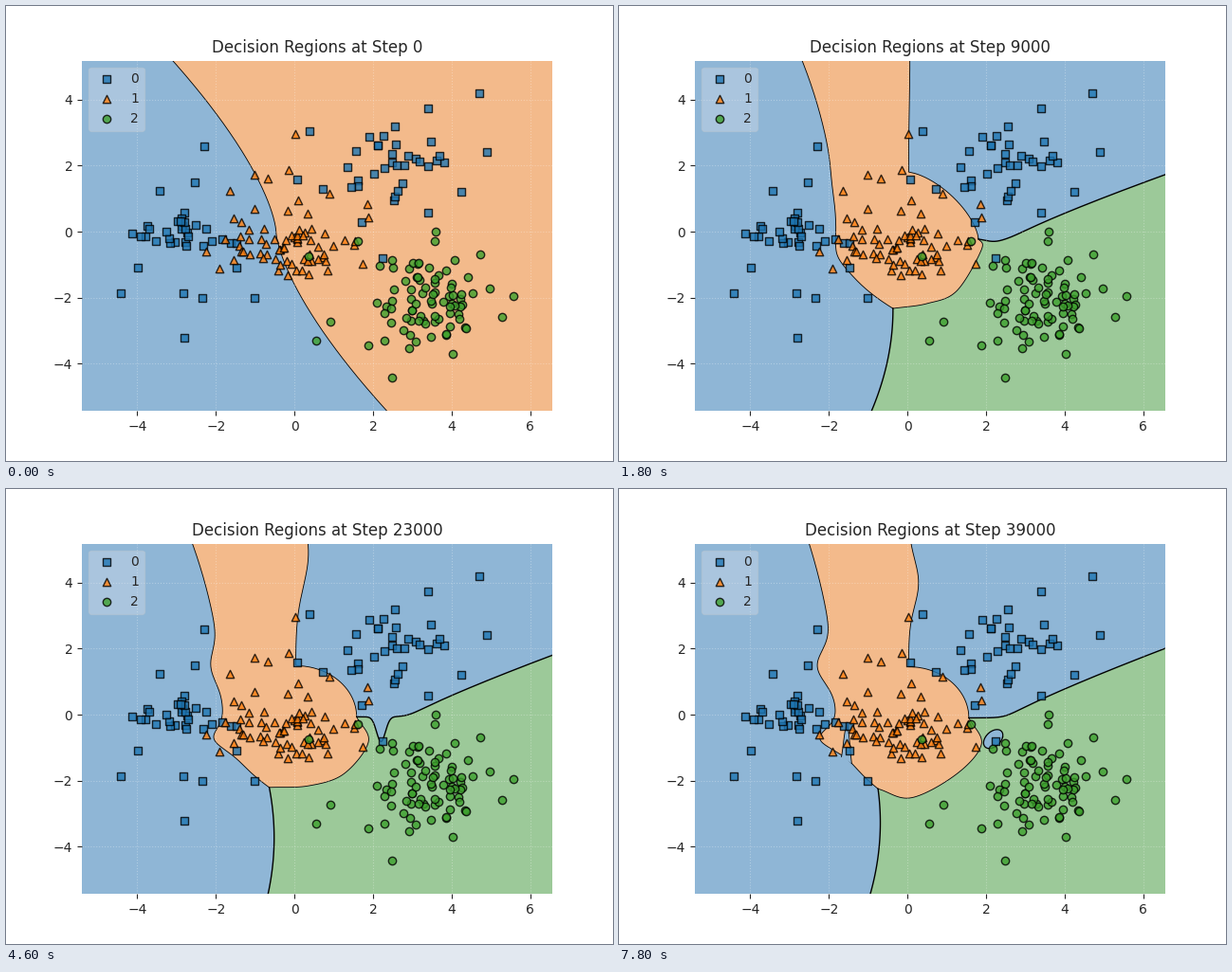
Animation, 640 px wide and 480 px high, one loop 8000 ms. Source, as a matplotlib script:

```python
import numpy as np
import matplotlib.pyplot as plt
from matplotlib.animation import FuncAnimation
from matplotlib.colors import to_rgb

INK, FACE = "#262626", "#eaeaf2"
BLUE, ORANGE, GREEN = "#1f77b4", "#ff7f0e", "#3ca02c"
FRAMES = 40
RIGHT = 6.56      # right end of the x axis
SPLIT = 28        # frame at which the notch becomes an island

plt.rcParams.update({"font.family": "DejaVu Sans", "text.color": INK,
                     "xtick.color": INK, "ytick.color": INK})
rng = np.random.default_rng(7)


def tint(color):
    return 0.45 * np.array(to_rgb(color)) + 0.55 * np.array(to_rgb(FACE))


def bump(v, center, width):
    return np.exp(-((v - center) / width) ** 2)


def at(i, *values):
    """Value at frame i from five stages of the training."""
    return np.interp(i, (1, 9, 16, 25, 39), values)


def ramp(i, start, end):
    return np.clip((i - start) / (end - start), 0, 1)


def smooth(pts, n=16):
    """Catmull-Rom curve through the points."""
    p = np.array(pts, float)
    p = np.vstack([2 * p[0] - p[1], p, 2 * p[-1] - p[-2]])
    t = np.linspace(0, 1, n, endpoint=False)[:, None]
    parts = []
    for a, b, c, d in zip(p, p[1:], p[2:], p[3:]):
        parts.append(b + 0.5 * t * (c - a + t * (2 * a - 5 * b + 4 * c - d
                                                 + t * (3 * (b - c) + d - a))))
    return np.vstack(parts + [p[-2:-1]])


def cluster(n, center, spread, outliers):
    """A trimmed normal cloud plus its few outlying samples."""
    z = rng.normal(size=(n * 4, 2))
    z = z[np.hypot(*z.T) < 1.9][:n]
    return np.vstack([center + z * spread, outliers])


# --- region borders --------------------------------------------------------
def first_cut():
    y = np.linspace(5.4, -5.7, 200)
    return np.column_stack([-0.47 - 0.234 * np.sign(y) * np.abs(y) ** 1.47, y])


def left_border(i, b):
    y = np.linspace(5.4, b[1], 250)
    up, down = np.maximum(y, 0), np.maximum(-y, 0)
    grow = ramp(i, 5, 32)
    x = -1.82 - (0.92 - 0.006 * i) * (up / 5.2) ** 2
    x += (b[0] + 1.82) * (down / -b[1]) ** 2.2
    x -= 0.42 * grow ** 1.3 * bump(y, 1.45, 0.7) + 0.5 * grow * bump(y, -0.75, 0.42)
    return np.column_stack([x, y])


def right_border(i, a):
    """A nearly upright wall that rounds off into a shoulder."""
    y = np.linspace(5.4, a[1], 400)
    late = ramp(i, 18, 39)
    wall = 0.03 + (at(i, -0.25, 0.03, 0.3, 0.33, 0.25)
                   * bump(y, 5.2 - 1.2 * late, 1.6 - 0.6 * late))
    height = at(i, 3.1, 2.0, 1.55, 1.55, 1.55)
    power = at(i, 1, 1.5, 2, 2, 2)
    s = np.clip((y - a[1]) / height, 0, 1)
    return np.column_stack([wall + (a[0] - wall) * (1 - s ** power) ** (1 / power), y])


def base_border(i, a, b):
    return smooth([a, (1.88, at(i, -0.45, -0.55, -0.75, -0.85, -0.9)), (1.25, -1.8),
                   (at(i, 0.5, 0.5, 0.4, 0.35, 0.1),
                    at(i, -2.25, -2.18, -2.15, -2.16, -2.52)), b])


def ridge_border(i, a):
    """Flat start, then a slightly concave climb, with a growing notch."""
    x = np.linspace(a[0], RIGHT + 0.3, 400)
    foot = at(i, 2.6, 2.65, 2.9, 2.9, 2.5)
    end = at(i, 1.0, 1.73, 1.84, 1.79, 2.01)
    climb = 0.12 * np.log1p(np.exp((x - foot) / 0.12)) / (RIGHT - foot)
    y = a[1] + (end - a[1]) * climb ** 0.88
    if i < SPLIT:
        depth = 0.1 * ramp(i, 5, 9) + 0.65 * ramp(i, 9, 23) + 0.1 * ramp(i, 23, 27)
        y -= depth * bump(x, 2.2, 0.35 - 0.19 * ramp(i, 9, 23))
    return np.column_stack([x, y])


def stem_border(i, b):
    v = np.linspace(0, 1.08, 60)
    end = at(i, -0.98, -0.92, -0.73, -0.66, -0.95)
    x = b[0] + (end - b[0]) * v + 0.56 * v * (1 - v)
    return np.column_stack([x, b[1] + (-5.45 - b[1]) * v])


def island(i):
    t = np.linspace(0, 2 * np.pi, 60)
    return np.column_stack([2.18 + 0.24 * np.cos(t) + 0.05 * np.sin(t),
                            -0.74 + 0.28 * np.sin(t) + 0.06 * np.cos(t)])


def slit(i):
    tip = -1.36 + 1.06 * ramp(i, 32, 39)
    return smooth([(-1.68, -1.28), (-1.54, tip), (-1.42, -1.48)])


# --- figure ------------------------------------------------------------------
fig = plt.figure(figsize=(6.4, 4.8), dpi=100)
ax = fig.add_axes([0.125, 0.11, 0.775, 0.77])
ax.set(xlim=((80 - 304.2) / 41.45, (576 - 304.2) / 41.45),
       ylim=((238 - 427.2) / 34.8, (238 - 57.6) / 34.8),
       xticks=range(-4, 7, 2), yticks=range(-4, 5, 2), facecolor=tint(BLUE))
ax.grid(True, color="white", linestyle=":", linewidth=0.8, alpha=0.3)
for line in ax.get_xgridlines() + ax.get_ygridlines():
    line.set_zorder(1.8)
ax.spines[:].set_visible(False)


def area(color, z=1):
    return ax.fill([0, 0, 0], [0, 0, 0], color=tint(color), lw=0, zorder=z)[0]


def stroke(width, z=1.5):
    return ax.plot([], [], color="black", lw=width, zorder=z)[0]


green_area, orange_area = area(GREEN), area(ORANGE)
thin = [stroke(0.6) for _ in range(3)]
thick = [stroke(1.0) for _ in range(2)]
pockets = [(SPLIT, island, area(BLUE, 1.6), stroke(0.9, 1.7)),
           (33, slit, area(BLUE, 1.6), stroke(0.6, 1.7))]

blue = np.vstack([
    cluster(28, (-2.85, 0.05), (0.7, 0.4),
            [(-4.42, -1.87), (-3.99, -1.1), (-2.8, -3.22), (-2.3, 2.58),
             (-3.43, 1.23), (-2.55, 1.5), (-2.35, -2), (-2.83, -1.88),
             (-1.03, -2.02), (-1.48, -1.1), (-1.62, -0.35), (-1.48, -0.35)]),
    cluster(29, (2.55, 2.05), (0.95, 0.75),
            [(4.7, 4.19), (3.4, 3.75), (4.9, 2.4), (0.38, 3.04), (0.07, 1.58),
             (0.72, 1.3), (1.7, 0.28), (2.24, -0.8), (4.25, 1.2), (3.4, 0.57)])])
orange = cluster(62, (-0.15, -0.2), (0.9, 0.65),
                 [(0.02, 2.95), (-0.15, 1.86), (-1.03, 1.72), (-0.68, 1.6),
                  (-1.64, 1.25), (0.89, 1.14), (1.85, 0.83), (1.88, 0.42),
                  (-2.25, -0.59), (1.74, -0.98), (-1.9, -1.12)])
green = cluster(74, (3.2, -1.9), (1.0, 0.9),
                [(1.62, -0.3), (0.36, -0.75), (0.55, -3.3), (2.48, -4.43),
                 (5.57, -1.96), (5.27, -2.58), (4.73, -0.7), (3.6, 0),
                 (1.88, -3.46), (4.03, -3.7), (0.9, -2.73)])
for label, color, mark, pts in (("0", BLUE, "s", blue), ("1", ORANGE, "^", orange),
                                ("2", GREEN, "o", green)):
    ax.scatter(*pts.T, c=color, marker=mark, alpha=0.8, edgecolor="black",
               label=label, zorder=2)
ax.legend(loc="upper left", framealpha=0.3, facecolor=FACE, scatterpoints=1)
title = ax.set_title("", fontsize=12)


def update(i):
    title.set_text(f"Decision Regions at Step {i * 1000}")
    for start, shape, fill, edge in pockets:
        pts = shape(i)
        fill.set_xy(pts)
        edge.set_data(*pts.T)
        fill.set_visible(i >= start)
        edge.set_visible(i >= start)
    for part in (green_area, *thin[1:], *thick):
        part.set_visible(i > 0)

    if i == 0:
        cut = first_cut()
        orange_area.set_xy(np.vstack([cut, [(7, -6), (7, 6)]]))
        thin[0].set_data(*cut.T)
        return []

    # the two corners where all three regions meet
    a = (at(i, 2.1, 1.8, 1.58, 1.58, 1.56), at(i, -0.08, -0.2, -0.06, -0.07, -0.1))
    b = (at(i, -0.65, -0.37, -0.51, -0.68, -0.75),
         at(i, -2.5, -2.33, -2.27, -2.19, -2.25))
    left, right, base = left_border(i, b), right_border(i, a), base_border(i, a, b)
    ridge, stem = ridge_border(i, a), stem_border(i, b)
    for ln, pts in zip(thin + thick, (left, right, base, ridge, stem)):
        ln.set_data(*pts.T)
    orange_area.set_xy(np.vstack([left, base[::-1], right[::-1]]))
    green_area.set_xy(np.vstack([ridge[::-1], base, stem, [(7, -6)]]))
    return []


anim = FuncAnimation(fig, update, frames=FRAMES, init_func=lambda: [],
                     interval=200, repeat=True, repeat_delay=0, blit=False)
plt.show()
```
